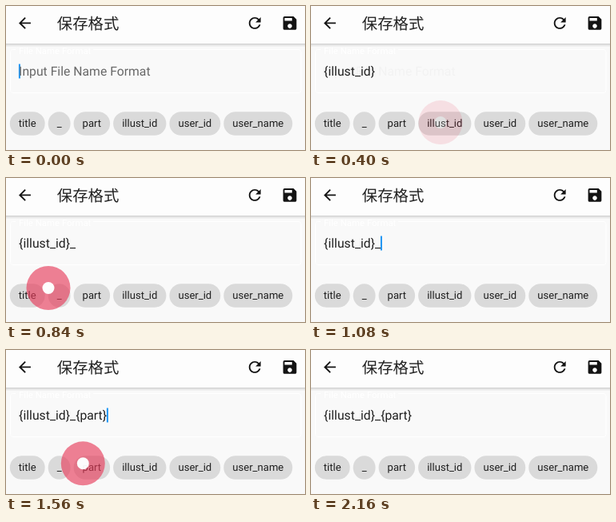
An HTML page that plays this animation: 374 by 180 pixels, repeating every 2.39 s.

```html
<!DOCTYPE html>
<html lang="zh-CN">
<head>
<meta charset="utf-8">
<title>保存格式</title>
<style>
  html, body { margin: 0; width: 100%; height: 100%; overflow: hidden; background: #f9f9f9; }
  svg { display: block; width: 374px; height: 180px; }
  text { font-family: Roboto, "Noto Sans", sans-serif; fill: #202020; text-rendering: geometricPrecision; }
  .title { font: 400 19.4px "Noto Sans CJK SC", "Noto Sans CJK", sans-serif; }
  .field { font-size: 15.75px; }
  .label { font-size: 11.4px; fill: #fff; }
  .chip { font-size: 13.1px; }
  .hint { fill: #686868; }
</style>
</head>
<body>
<svg viewBox="0 0 374 180">
  <defs>
    <linearGradient id="shade" x2="0" y2="1">
      <stop offset="0" stop-opacity=".24"/>
      <stop offset=".4" stop-opacity=".09"/>
      <stop offset="1" stop-opacity="0"/>
    </linearGradient>
  </defs>
  <rect width="374" height="180" fill="#f9f9f9"/>
  <rect y="46.5" width="374" height="5" fill="url(#shade)"/>
  <rect width="374" height="47" fill="#fdfdfd"/>
  <g id="icons" fill="#141414"></g>
  <text class="title" x="63.8" y="29.1">保存格式</text>

  <path d="M12 54.5H8.5Q5.5 54.5 5.5 57.5V105.5Q5.5 108.5 8.5 108.5H366Q369 108.5 369 105.5V57.5Q369 54.5 366 54.5H109" fill="none" stroke="#fff"/>
  <text class="label" x="16" y="60">File Name Format</text>
  <rect id="caret" y="72.5" width="2" height="18" fill="#2196f3"/>
  <text id="hint" class="field hint" x="16.1" y="86.8">Input File Name Format</text>
  <text id="value" class="field" x="16.1" y="86.8"></text>
  <g id="chips"></g>
  <g id="taps"></g>
</svg>
<script>
const LOOP = 2390, TICK = 80, FADE = 280, RELEASE = 240;
const TEXT_X = 16.1;
const $ = id => document.getElementById(id);
const clamp = v => Math.min(1, Math.max(0, v));
const smooth = v => v * v * (3 - 2 * v);

function add(parent, tag, attrs, text) {
  const el = document.createElementNS("http://www.w3.org/2000/svg", tag);
  for (const k in attrs) el.setAttribute(k, attrs[k]);
  if (text) el.textContent = text;
  return parent.appendChild(el);
}

const icons = [
  [23.5, "M20 11H7.83l5.59-5.59L12 4l-8 8 8 8 1.41-1.41L7.83 13H20v-2z"],
  [311.2, "M17.65 6.35C16.2 4.9 14.21 4 12 4c-4.42 0-7.99 3.58-7.99 8s3.57 8 7.99 8c3.73 0 6.84-2.55 7.73-6h-2.08c-.82 2.33-3.04 4-5.65 4-3.31 0-6-2.69-6-6s2.69-6 6-6c1.66 0 3.14.69 4.22 1.78L13 11h7V4l-2.35 2.35z"],
  [355, "M17 3H5c-1.11 0-2 .9-2 2v14c0 1.1.89 2 2 2h14c1.1 0 2-.9 2-2V7l-4-4zm-5 16c-1.66 0-3-1.34-3-3s1.34-3 3-3 3 1.34 3 3-1.34 3-3 3zm3-10H5V5h10v4z"]
];
for (const [x, d] of icons)
  add($("icons"), "path", { d, transform: `translate(${x} 21.4) scale(.93) translate(-12 -12)` });

// Chips flow from left to right, each as wide as its text plus padding.
let x = 4.8;
for (const name of ["title", "_", "part", "illust_id", "user_id", "user_name"]) {
  const pill = add($("chips"), "rect", { x, y: 132.3, height: 29.4, rx: 14.7, fill: "#dadada" });
  const label = add($("chips"), "text", { class: "chip", x: x + 11, y: 151.4 }, name);
  const width = label.getComputedTextLength() + 22;
  pill.setAttribute("width", width);
  x += width + 4;
}

const taps = [
  { cx: 162, cy: 145.6, start: 160, end: 480, text: "{illust_id}" },
  { cx: 53, cy: 137.5, start: 680, end: 1080, text: "_" },
  { cx: 96.3, cy: 141.8, start: 1480, end: 1800, text: "{part}" }
];
for (const tap of taps) {
  tap.el = add($("taps"), "g", {});
  add(tap.el, "circle", { cx: tap.cx, cy: tap.cy, r: 27.5, fill: "#e83c5a", "fill-opacity": .68 });
  add(tap.el, "circle", { cx: tap.cx, cy: tap.cy, r: 7.5, fill: "#fff" });
}

const blinks = [[0, 320], [920, 1320], [1560, 2120]];

// Fades advance in whole ticks, counted from the touch.
function fade(tap, t) {
  const held = tap.start + Math.floor((t - tap.start) / TICK) * TICK;
  return smooth(clamp((tap.end - held) / FADE));
}

function draw(t) {
  for (const tap of taps)
    tap.el.setAttribute("opacity", t < tap.start ? 0 : fade(tap, t));

  const value = $("value");
  value.textContent = taps.filter(tap => t >= tap.end - RELEASE).map(tap => tap.text).join("");
  $("hint").setAttribute("opacity", value.textContent ? fade(taps[0], t) ** 2 : 1);

  const width = value.textContent ? value.getComputedTextLength() : 0;
  $("caret").setAttribute("x", TEXT_X + width - .2);
  $("caret").setAttribute("opacity", blinks.some(([on, off]) => t >= on && t < off) ? 1 : 0);
}

const begin = performance.now();
function loop() {
  draw((performance.now() - begin) % LOOP);
  requestAnimationFrame(loop);
}
loop();
</script>
</body>
</html>
```
